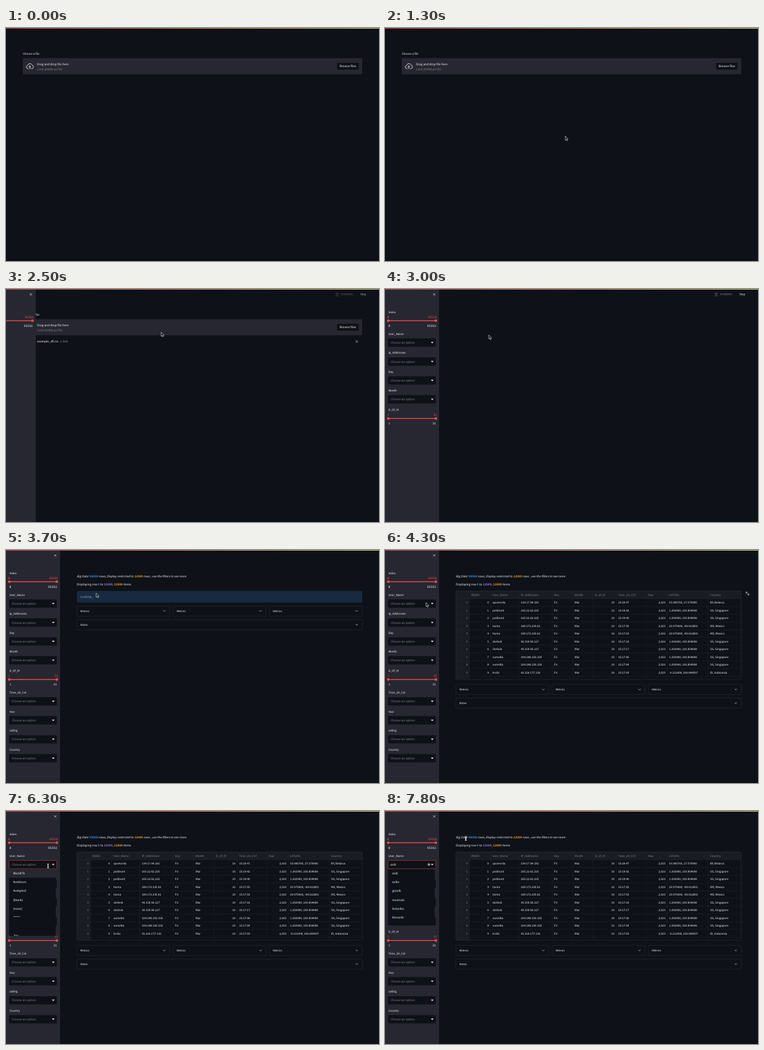
Animation, 600 px wide and 375 px high, one loop 8 s. Source, as an HTML page:

```html
<!DOCTYPE html>
<html lang="en">
<head>
<meta charset="utf-8">
<title>Data filter demo</title>
<style>
html, body { margin: 0; height: 100%; overflow: hidden; background: #0e1117; }
svg { display: block; }
#stage { width: 100vw; height: 100vh; }
text { font-family: "Noto Sans CJK JP", "Noto Sans CJK SC", "Noto Sans CJK", "Open Sans", sans-serif;
  fill: #fafafa; white-space: pre; text-rendering: geometricPrecision; }
.mono { font-family: "Noto Sans Mono", monospace; }
.dim { fill: #85868c; }
.red { fill: #ff4b4b; }
.b { font-weight: 700; }
.i { font-style: italic; }
.end { text-anchor: end; }
.mid { text-anchor: middle; }
.line { fill: none; stroke: #fafafa; stroke-width: .6; stroke-linecap: round; stroke-linejoin: round; }
</style>
</head>
<body>
<svg id="stage" viewBox="0 0 600 375"></svg>
<script>
const LOOP = 8000, STEP = 100, LABEL = 5.05, BODY = 5.33;
const BG = '#0e1117', PANEL = '#262730', RED = '#ff4b4b', EDGE = '#3b3d43';

// y is the middle of the capitals
const text = (x, y, s, size = BODY, cls = '') => {
  const px = /mono/.test(cls) ? size : size * .895;
  return `<text x="${x}" y="${y + size * .33}" font-size="${px}" class="${cls}">${s}</text>`;
};
const rect = (x, y, w, h, fill, more = '') =>
  `<rect x="${x}" y="${y}" width="${w}" height="${h}" fill="${fill}" ${more}/>`;
const path = (d, more = 'class="line"') => `<path d="${d}" ${more}/>`;
const bold = (s, color) => `<tspan class="b" style="fill:${color}">${s}</tspan>`;
const cross = (x, y, r) => path(`M${x - r} ${y - r}l${2 * r} ${2 * r}M${x + r} ${y - r}l${-2 * r} ${2 * r}`);

// content shown from start to end, with optional fades
const show = (start, end, body, fadeIn = 0, fadeOut = 0) =>
  `<g data-span="${[start, end, fadeIn, fadeOut]}">${body}</g>`;

// ---- upload page
const uploader =
  text(27, 41.5, 'Choose a file', LABEL) +
  rect(27, 48.5, 546, 26, PANEL, 'rx="1.4"') +
  path('M35.8 65.4h-.6a2.7 2.7 0 0 1-.3-5.3a3.7 3.7 0 0 1 7-.6a3 3 0 0 1-.4 5.9h-.7M38.3 65.6v-4.6m-1.8 1.8l1.8-1.8l1.8 1.8',
    'class="line" style="stroke-width:.9;stroke:#e0e0e3"') +
  text(50, 58, 'Drag and drop file here') +
  text(50, 66.6, 'Limit 200MB per file', 4.95, 'dim') +
  rect(532.2, 55.6, 35.4, 11.8, BG, `rx="1.4" stroke="${EDGE}" stroke-width=".35"`) +
  text(550, 61.5, 'Browse files', BODY, 'mid');
const fileRow =
  path('M35.8 81.2h3.4l2.3 2.3v5.6h-5.7zM39.1 81.3v2.3h2.3') +
  text(50, 84.5, 'example_df.csv') + text(87, 84.5, '8.9MB', 4.93, 'dim') +
  cross(564.3, 84.5, 1.5);
const running =
  path('M530.5 11h4.8M531 5.5l1.5 2.8l2.5-2.2M530.6 8.8l2 .3l2-1.3', 'class="line" style="stroke:#7b7c82"') +
  text(539, 8.4, 'RUNNING...', 4.75, 'dim');
const stop = text(570, 8.4, 'Stop', 4.9);

// ---- sidebar widgets
const arrowDown = y => path(`M73.8 ${y - 1}h4.4l-2.2 2.3z`, 'fill="#e6e6e8"');
const select = (name, y) => text(5.4, y, name, LABEL) +
  rect(5, y + 7.3, 76.8, 13.4, BG, 'rx="1.4"') +
  (name == 'User_Name' ? show(0, 6600, text(9, y + 14, 'Choose an option', BODY, 'dim'))
    : text(9, y + 14, 'Choose an option', BODY, 'dim')) + arrowDown(y + 14);
const slider = (name, y, min, max) => text(5.4, y, name, LABEL) +
  text(3.6, y + 8, min, 4.75, 'mono red') + text(83.6, y + 8, max, 4.75, 'mono red end') +
  rect(5, y + 13.4, 77, 1.3, RED) +
  [5.2, 81.8].map(x => `<circle cx="${x}" cy="${y + 14}" r="2.1" fill="${RED}"/>`).join('') +
  text(5.4, y + 22, min, 4.75, 'mono') + text(82, y + 22, max, 4.75, 'mono end');
const widgets = [
  slider('Index', 37, 0, 95592), select('User_Name', 72.2), select('Ip_Addresses', 102.8),
  select('Day', 133.1), select('Month', 163.5), slider('D_Of_M', 194.4, 1, 31),
  select('Time_24_Cst', 229.6), select('Year', 260), select('Latlng', 290.6), select('Country', 321.1)
];
const sidebar = '<g id="side">' + rect(0, 0, 87, 375, PANEL) + cross(79.2, 8.7, 1.5) +
  widgets.map((w, i) => show(2500 + i * 100 - (i < 6 ? 50 : 0), LOOP, w)).join('') + '</g>';

// ---- results
const summary =
  text(114, 41.8, `Big Data! ${bold('95593', '#3d9df3')} rows, Display restricted to ${bold('12000', '#ffa421')} rows , use the filters to see more`, 5.2, 'i') +
  text(114, 55.7, `Displaying row ${bold('0', '#3d9df3')} to ${bold('11999', '#a57bf5')}, ${bold('12000', '#ffa421')} items`);
const loading = rect(114, 66, 459, 18.5, '#172a3f', 'rx="1.4"') +
  `<g opacity=".65">${text(119.6, 75.2, 'Loading...').replace('<text', '<text style="fill:#c7ebff"')}</g>`;
const expander = (x, y, w, name) =>
  rect(x, y, w, 16.4, 'none', `rx="1.4" stroke="${EDGE}" stroke-width=".4"`) +
  text(x + 5.6, y + 8.3, name, 4.9) + path(`M${x + w - 10.3} ${y + 7.6}l1.5 1.5l1.5-1.5`);
const expanders = y => [114, 268.8, 423.6].map(x => expander(x, y, 149.4, 'Metrics')).join('') +
  expander(114, y + 22, 459, 'Notes');

const edges = [114, 136, 170, 215.5, 269, 302, 335, 372, 420, 454, 520, 573];
const heads = ['', 'INDEX', 'User_Name', 'IP_Addresses', 'Day', 'Month', 'D_of_M', 'Time_24_CST', 'Year', 'LATLNG', 'Country'];
const singapore = ['1.292900, 103.854698', 'SG, Singapore'], mexico = ['20.975000, -89.612801', 'MX, Mexico'];
const records = [
  ['quvmorta', '134.17.94.181', '20:47', '53.900705, 27.570900', 'BY, Belarus'],
  ['poldrunt', '165.22.62.225', '19:42', ...singapore],
  ['poldrunt', '165.22.62.225', '19:40', ...singapore],
  ['tivma', '189.172.235.61', '17:55', ...mexico],
  ['tivma', '189.172.235.61', '17:53', ...mexico],
  ['dorbok', '43.159.58.127', '17:18', ...singapore],
  ['dorbok', '43.159.58.127', '17:17', ...singapore],
  ['vumelta', '104.248.150.150', '17:06', ...singapore],
  ['vumelta', '104.248.150.150', '17:04', ...singapore],
  ['krobi', '41.216.177.116', '17:03', '-6.211400, 106.844597', 'ID, Indonesia']
];
const rightAligned = [0, 1, 6, 8];
const cell = (s, col, y) => rightAligned.includes(col)
  ? text(edges[col + 1] - 3, y, s, LABEL, col ? 'end' : 'end dim')
  : text(edges[col] + 3, y, s, LABEL);
const rowTop = r => 78.5 + r * 12.48;
const table =
  rect(114, 66, 459, 12.5, '#1a1c24') + rect(114, 66, 22, 142, '#1a1c24') +
  edges.slice(1, -1).map(x => rect(x - .17, 66, .35, 142, '#292c33')).join('') +
  [...records, 0].map((_, r) => rect(114, rowTop(r) - .17, 459, .35, '#292c33')).join('') +
  heads.map((h, c) => text(edges[c] + 3, 72.2, h, LABEL, 'dim')).join('') +
  records.map(([user, ip, time, place, country], r) =>
    [r, r, user, ip, 'Fri', 'Mar', 10, '15:' + time, '2,023', place, country]
      .map((s, c) => cell(s, c, rowTop(r) + 6.3)).join('')).join('') +
  rect(114, 66, 459, 142, 'none', `rx="1.4" stroke="${EDGE}" stroke-width=".4"`);
const expandButton = rect(579.8, 66.8, 6.4, 6.4, '#1a1c24', 'rx="1"') +
  path('M582.6 69.6l-1.8-1.8m0 1.6v-1.6h1.6M583.4 70.4l1.8 1.8m0-1.6v1.6h-1.6');

// ---- name search
const popup = (items, height, marked) => `<svg x="5" y="93.5" width="75" height="${height}">` +
  rect(0, 0, 75, height, BG, 'rx="1.4"') + (marked ? rect(0, 0, 75, 13.8, PANEL) : '') +
  items.map((s, i) => text(6.4, 6.7 + i * 14.25, s)).join('') + '</svg>';
const caret = x => rect(x, 83, .5, 7, '#fafafa');
const typed = (start, end, s, caretX, caretEnd, items) => show(start, end,
  text(8.5, 86.2, s) + show(start, caretEnd, caret(caretX)) + popup(items, Math.min(107.5, items.length * 14.25 + 2)));
const search =
  show(5700, LOOP, rect(5, 79.5, 76.8, 13.4, 'none', `rx="1.4" stroke="${RED}" stroke-width=".45"`)) +
  show(5700, 6300, caret(8.6)) +
  show(5700, 6600, popup(['#brolt7k', '#vektrum', '#vekplod', '(blank)', '(none]', '*****', '.', '.lno'], 107.5, true), 200) +
  show(6600, LOOP, '<circle cx="70.5" cy="86.2" r="1.6" class="line"/>' + cross(70.5, 86.2, .6)) +
  typed(6600, 6900, 'o', 11.7, 6900, ['#brolt7k', '#vekplod', '(none]', '.lno', 'obrek', 'ovuntil', 'ozib', 'ozibs']) +
  typed(6900, 7100, 'oz', 14.2, 7100, ['ozib', 'ozibs', 'ozrunt', 'gozzib', 'mozirubi', 'holzeibo', 'thonzrib', 'vorzel']) +
  typed(7100, 7300, 'ozi', 15.6, 7300, ['ozib', 'ozibs', 'gozzib', 'mozirubi', 'holzeibo', 'thonzrib', 'bolzink', 'dovzim']) +
  typed(7300, LOOP, 'ozib', 19.2, 7700, ['ozib', 'ozibs', 'gozzib', 'mozirubi', 'holzeibo', 'thonzrib']);

// ---- pointer
const pointer = '<g id="pointer">' +
  show(1300, 4500, path('M0 0v6.6l1.5-1.4l1 2.3l1.1-.5l-1-2.2h2z', 'fill="#111" stroke="#fff" stroke-width=".55"')) +
  show(4500, 6600, '<use href="#beam"/>') + show(7700, LOOP, '<use href="#beam"/>') + '</g>';
const beam = '<defs><path id="beam" d="M-1.4-3.4q1.4 0 1.4.9v5q0 .9 1.4.9M1.4-3.4q-1.4 0-1.4.9v5q0 .9-1.4.9M-.8 1h1.6" fill="none" stroke="#fff" stroke-width=".8"/></defs>';
const route = [[1300, 290, 174], [1900, 288, 67.5], [2200, 288, 67.5], [3000, 167, 74], [3700, 145, 69.5],
  [4300, 66, 84.6], [4500, 67.6, 88.5], [7600, 67.6, 88.5], [7800, 130, 44.2], [8000, 130, 44.2]];

const stage = document.getElementById('stage');
stage.innerHTML =
  '<defs><linearGradient id="bar"><stop stop-color="#ff4b4b"/><stop offset="1" stop-color="#fffd80"/></linearGradient></defs>' + beam +
  show(0, 2600, uploader) + show(1800, 2600, fileRow) +
  show(2200, 3600, running + stop, 500, 300) +
  show(3300, LOOP, summary) + show(3500, 3900, loading) +
  show(3600, 3900, expanders(90)) + show(3900, LOOP, table + expanders(216.2)) +
  show(3900, 4700, expandButton, 200, 200) +
  sidebar + search + rect(0, 0, 600, .8, 'url(#bar)') + pointer;

const side = document.getElementById('side'), hand = document.getElementById('pointer');
const layers = [...document.querySelectorAll('[data-span]')].map(el => [el, ...el.dataset.span.split(',').map(Number)]);
const clamp = v => Math.max(0, Math.min(1, v));
const ease = v => v * v * (3 - 2 * v);

function draw(t) {
  for (const [el, start, end, fadeIn, fadeOut] of layers) {
    const on = t >= start && t < end;
    el.style.display = on ? '' : 'none';
    if (on) el.style.opacity = Math.min(fadeIn ? clamp((t - start + 50) / fadeIn) : 1, fadeOut ? clamp((end - t) / fadeOut) : 1);
  }
  const slide = clamp((t - 2400) / 300);
  side.setAttribute('transform', `translate(${-88 * (1 - slide) ** 2} 0)`);
  const k = Math.max(1, route.findIndex(p => p[0] > t));
  const [t0, x0, y0] = route[k - 1], [t1, x1, y1] = route[k];
  const p = ease(clamp((t - t0) / (t1 - t0)));
  hand.setAttribute('transform', `translate(${x0 + (x1 - x0) * p} ${y0 + (y1 - y0) * p})`);
}
function tick() {
  draw(Math.floor(performance.now() % LOOP / STEP) * STEP);
  requestAnimationFrame(tick);
}
tick();
</script>
</body>
</html>
```
